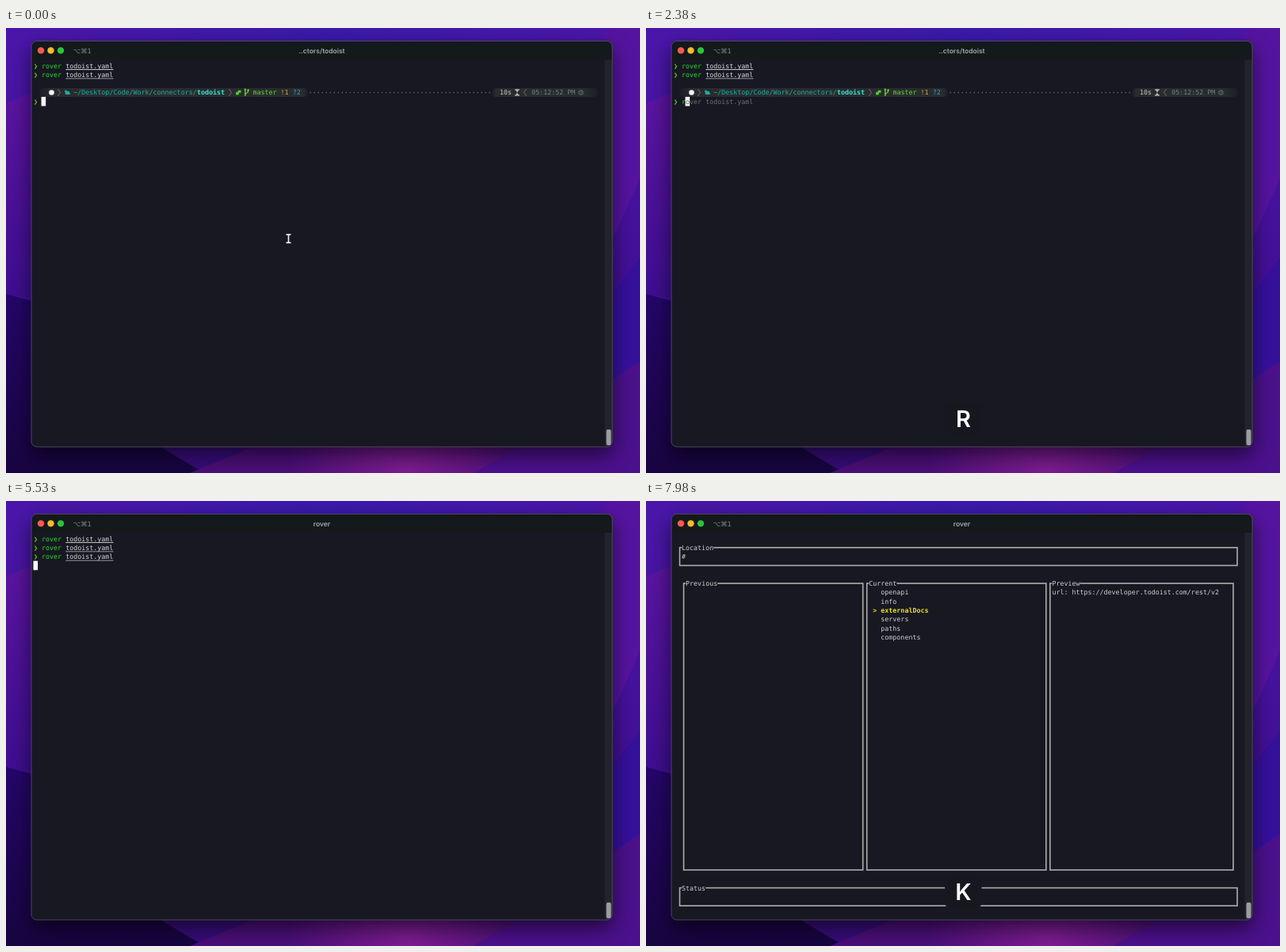
An HTML page with a canvas for the animation above (8000 ms loop, 800x562 px).

```html
<!DOCTYPE html>
<html lang="en">
<head>
<meta charset="utf-8">
<title>Terminal session</title>
<style>
html, body { margin: 0; width: 100%; height: 100%; overflow: hidden; background: #2a0a70; }
canvas { display: block; width: 800px; height: 562px; }
</style>
</head>
<body>
<canvas id="stage" width="800" height="562"></canvas>
<script>
const W = 800, H = 562, LOOP = 8000;
const ctx = document.getElementById('stage').getContext('2d');

const BG = '#171822', FG = '#cfcfcd', LINE = '#aeaeaa';
const GREEN = '#2fd63a', YELLOW = '#ecdf1c', WHITE = '#f4f4f4';
const MONO = '"DejaVu Sans Mono", "Liberation Mono", monospace';
const SANS = 'Inter, "Liberation Sans", sans-serif';

// terminal grid
const CW = 5.025, RH = 11.31, X0 = 35, Y0 = 47.5;
const col = c => X0 + c * CW;
const row = r => Y0 + r * RH;

const FILE = 'todoist.yaml';
const TYPED = [2240, 2590, 2870, 3080, 3360];
const TAB = 4270, ENTER = 5250, OPEN = 5600;
const MOVES = [[OPEN, 0], [6230, 1], [6790, 2], [7280, 3], [7770, 2]];

const KEYS = [
  ...TYPED.map((at, i) => ({ at, key: 'ROVER'[i] })),
  { at: 3710, key: 'R', fade: 350 },
  { at: TAB, key: 'tab' },
  { at: ENTER, key: '' },
  { at: 6230, key: 'J' },
  { at: 7770, key: 'K' }
];

const ITEMS = ['openapi', 'info', 'externalDocs', 'servers', 'paths', 'components'];
const PREVIEWS = [
  ['3.0.0'],
  ['title: Todoist', 'description: Todoist Swagger spec', 'contact:',
   '  email: marlon@quendalist.com', 'license:', '  name: Apache 2.0',
   '  url: http://www.apache.org/licenses/LICENSE', "version: '2.0'"],
  ['url: https://developer.todoist.com/rest/v2'],
  ['- url: https://api.todoist.com/rest/v2']
];

function rect(x, y, w, h, fill, r = 0) {
  ctx.fillStyle = fill;
  ctx.beginPath();
  ctx.roundRect(x, y, w, h, r);
  ctx.fill();
}

function disc(x, y, r, fill) {
  ctx.fillStyle = fill;
  ctx.beginPath();
  ctx.arc(x, y, r, 0, Math.PI * 2);
  ctx.fill();
}

function path(points, color, width, fill) {
  ctx.beginPath();
  points.forEach(([x, y], i) => i ? ctx.lineTo(x, y) : ctx.moveTo(x, y));
  if (fill) {
    ctx.fillStyle = color;
    ctx.fill();
  } else {
    ctx.strokeStyle = color;
    ctx.lineWidth = width;
    ctx.stroke();
  }
}

const poly = (color, ...points) => path(points, color, 0, true);

function gradient(g, stops) {
  stops.forEach(([at, color]) => g.addColorStop(at, color));
  return g;
}

function glow(x, y, r, color) {
  const g = ctx.createRadialGradient(x, y, 0, x, y, r);
  rect(0, 0, W, H, gradient(g, [[0, `rgba(${color},1)`], [1, `rgba(${color},0)`]]));
}

function term(c, r, s, color = FG, bold = false) {
  ctx.font = `${bold ? 'bold ' : ''}${CW / 0.602}px ${MONO}`;
  ctx.textAlign = 'left';
  ctx.fillStyle = color;
  ctx.fillText(s, col(c), row(r) + 3);
}

function wallpaper() {
  rect(0, 0, W, H, gradient(ctx.createLinearGradient(0, 0, 0, H),
    [[0, '#4a16aa'], [0.5, '#43109a'], [1, '#350c78']]));
  glow(400, -10, 330, '58,26,172');
  poly(gradient(ctx.createLinearGradient(0, 80, 0, 345), [[0, '#5a14a0'], [1, '#3d0d90']]),
    [0, 95], [32, 82], [110, 345], [0, 338]);
  poly(gradient(ctx.createLinearGradient(0, 335, 0, H), [[0, '#25056a'], [1, '#170440']]),
    [0, 336], [60, 352], [180, 520], [250, H], [0, H]);
  poly('#4a0e78', [232, H], [345, 515], [700, 515], [610, H]);
  glow(505, 560, 150, '126,28,144');
  poly('#4b108c', [590, H], [690, 505], [800, 405], [800, H]);
  poly('#35109c', [700, 490], [765, 335], [800, 290], [800, 420]);
  poly('#5513a0', [755, 0], [800, 0], [800, 190], [755, 290]);
}

function titleBar(title) {
  ctx.save();
  ctx.shadowColor = 'rgba(0,0,0,0.6)';
  ctx.shadowBlur = 26;
  ctx.shadowOffsetY = 10;
  rect(32, 16.5, 733, 512.5, BG, 7);
  ctx.restore();
  rect(32, 16.5, 733, 23.5, '#14191c', [7, 7, 0, 0]);
  rect(755.5, 40, 9.5, 488, '#22232b', [0, 0, 7, 0]);
  rect(757.5, 507, 6, 20, '#9d9d9f', 2);
  ctx.strokeStyle = '#4a4a54';
  ctx.lineWidth = 1;
  ctx.beginPath();
  ctx.roundRect(32, 16.5, 733, 512.5, 7);
  ctx.stroke();
  ['#fb5a52', '#f9bb2d', '#2ac43f'].forEach((c, i) => disc(44 + i * 12.5, 28.4, 4.2, c));
  ctx.textAlign = 'left';
  ctx.font = '8.4px "DejaVu Sans", sans-serif';
  ctx.fillStyle = '#858789';
  ctx.fillText('⌥⌘1', 84.5, 31.5);
  ctx.textAlign = 'center';
  ctx.font = `600 8.5px ${SANS}`;
  ctx.fillStyle = '#a5a7a8';
  ctx.fillText(title, 398.5, 31.5);
}

function link(c, r) {
  term(c, r, FILE, '#d8d8d8');
  rect(col(c), row(r) + 4.6, FILE.length * CW, 0.9, '#c4c4c4');
}

function command(r) {
  term(0, r, '❯', '#5fd71f', true);
  term(2, r, 'rover', GREEN);
  link(8, r);
}

function chevron(x, y, dir, color) {
  path([[x - 1.7 * dir, y - 4.5], [x + 1.7 * dir, y], [x - 1.7 * dir, y + 4.5]], color, 0.9);
}

function pill(x, w, solidFrom, solidTo) {
  const c = '#292c2e';
  rect(x, 76, w, 11, gradient(ctx.createLinearGradient(x, 0, x + w, 0),
    [[0, '#1b1d25'], [solidFrom, c], [solidTo, c], [1, '#1b1d25']]), 5);
}

function promptBar() {
  const y = row(3);
  pill(42, 339, 0.05, 0.98);
  pill(613, 134, 0.04, 0.88);
  disc(57.5, y, 3.3, WHITE);
  chevron(67, y, 1, '#777');
  poly('#1fa9a5', [74, y - 2.7], [76.7, y - 2.7], [77.5, y - 1.5], [80, y - 1.5],
    [81, y + 2.5], [75, y + 2.5]);
  term(10, 3, '~/Desktop/Code/Work/connectors/', '#20aaa2');
  term(41, 3, 'todoist', '#35e6dc', true);
  chevron(283, y, 1, '#777');
  rect(290, y - 0.8, 3.8, 3.8, '#58c92c', 1);
  rect(292.6, y - 2.8, 4, 3.2, '#58c92c', 1);
  path([[301.8, y - 4.2], [301.8, y + 4.5]], '#5fd735', 1.3);
  path([[305.5, y - 3.8], [305.5, y - 0.8], [301.8, y + 2]], '#5fd735', 1.2);
  disc(301.8, y - 3.7, 1.2, '#5fd735');
  disc(305.5, y - 3, 1.2, '#5fd735');
  term(55, 3, 'master', '#5fd735');
  term(62, 3, '!1', '#d3ac3e');
  term(65, 3, '?2', '#2f9fe0');
  for (let x = 383.5; x < 613; x += CW) rect(x, y - 0.6, 1.3, 1.3, '#62656d');
  term(117, 3, '10s', '#c6c6bd');
  path([[642, y - 3.6], [648, y - 3.6]], '#c6c6bd', 1.1);
  path([[642, y + 3.6], [648, y + 3.6]], '#c6c6bd', 1.1);
  poly('#b5b5ac', [642.8, y - 3.5], [647.2, y - 3.5], [642.8, y + 3.5], [647.2, y + 3.5]);
  chevron(655, y, -1, '#777');
  term(125, 3, '05:12:52 PM', '#668582');
  ctx.strokeStyle = '#668582';
  ctx.lineWidth = 0.9;
  ctx.beginPath();
  ctx.arc(725.5, y, 2.7, 0, Math.PI * 2);
  ctx.stroke();
  path([[725.5, y - 1.5], [725.5, y], [727, y]], '#668582', 0.8);
}

function caret(c, r, under = '') {
  rect(col(c) - 0.5, row(r) - 5.8, 5.6, 11.6, '#fff');
  if (under.trim()) term(c, r, under, '#555');
}

function shell(t) {
  command(0);
  command(1);
  if (t >= ENTER) {
    command(2);
    caret(0, 3);
    return;
  }
  promptBar();
  if (t >= TAB) {
    command(4);
    caret(21, 4);
    return;
  }
  const n = TYPED.filter(at => t >= at).length;
  term(0, 4, '❯', '#5fd71f', true);
  if (n) {
    const line = 'rover ' + FILE;
    term(2, 4, line.slice(0, n), GREEN);
    term(2 + n, 4, line.slice(n), '#6d6e72');
    caret(2 + n, 4, line[n]);
  } else {
    caret(2, 4);
    pointer(356.5, 266);
  }
}

function pointer(x, y) {
  for (const [color, w] of [['#222', 3.2], ['#eee', 1.6]]) {
    path([[x, y - 5], [x, y + 5]], color, w);
    path([[x - 3, y - 5.2], [x + 3, y - 5.2]], color, w);
    path([[x - 3, y + 5.2], [x + 3, y + 5.2]], color, w);
  }
}

function panel(name, c1, c2, r1, r2) {
  const x = col(c1 + 0.5), y = row(r1);
  ctx.strokeStyle = LINE;
  ctx.lineWidth = 1.6;
  ctx.strokeRect(x, y, (c2 - c1) * CW, row(r2) - y);
  rect(col(c1 + 1), y - 4, name.length * CW, 8, BG);
  term(c1 + 1, r1, name);
}

function browser(t) {
  const [, sel] = MOVES.filter(([at]) => t >= at).pop();
  panel('Location', 1, 141, 1, 3);
  term(2, 2, '#');
  panel('Previous', 2, 47, 5, 37);
  panel('Current', 48, 93, 5, 37);
  panel('Preview', 94, 140, 5, 37);
  panel('Status', 1, 141, 39, 41);
  ITEMS.forEach((item, i) => {
    const on = i === sel;
    if (on) term(50, 6 + i, '>', YELLOW, true);
    term(52, 6 + i, item, on ? YELLOW : FG, on);
  });
  PREVIEWS[sel].forEach((s, i) => term(95, 6 + i, s));
}

function keyCap(t) {
  const k = KEYS.filter(k => t >= k.at).pop();
  if (!k || !k.key) return;
  ctx.save();
  if (k.fade) ctx.globalAlpha = Math.max(0, 1 - (t - k.at) / k.fade);
  rect(377, 475, 46.5, 38.5, '#171720', 6);
  if (k.key === 'tab') {
    path([[388, 493], [406, 493]], '#fff', 3);
    path([[400.5, 487], [406.5, 493], [400.5, 499]], '#fff', 3);
    path([[411.2, 486], [411.2, 500]], '#fff', 2.8);
  } else {
    ctx.font = `600 29px ${SANS}`;
    ctx.textAlign = 'center';
    ctx.fillStyle = '#fff';
    ctx.fillText(k.key, 400.5, 504);
  }
  ctx.restore();
}

function draw(t) {
  wallpaper();
  titleBar(t >= ENTER ? 'rover' : '..ctors/todoist');
  if (t >= OPEN) browser(t); else shell(t);
  keyCap(t);
}

ctx.textRendering = 'geometricPrecision';
const start = performance.now();
function tick() {
  draw((performance.now() - start) % LOOP);
  requestAnimationFrame(tick);
}
tick();
</script>
</body>
</html>
```
